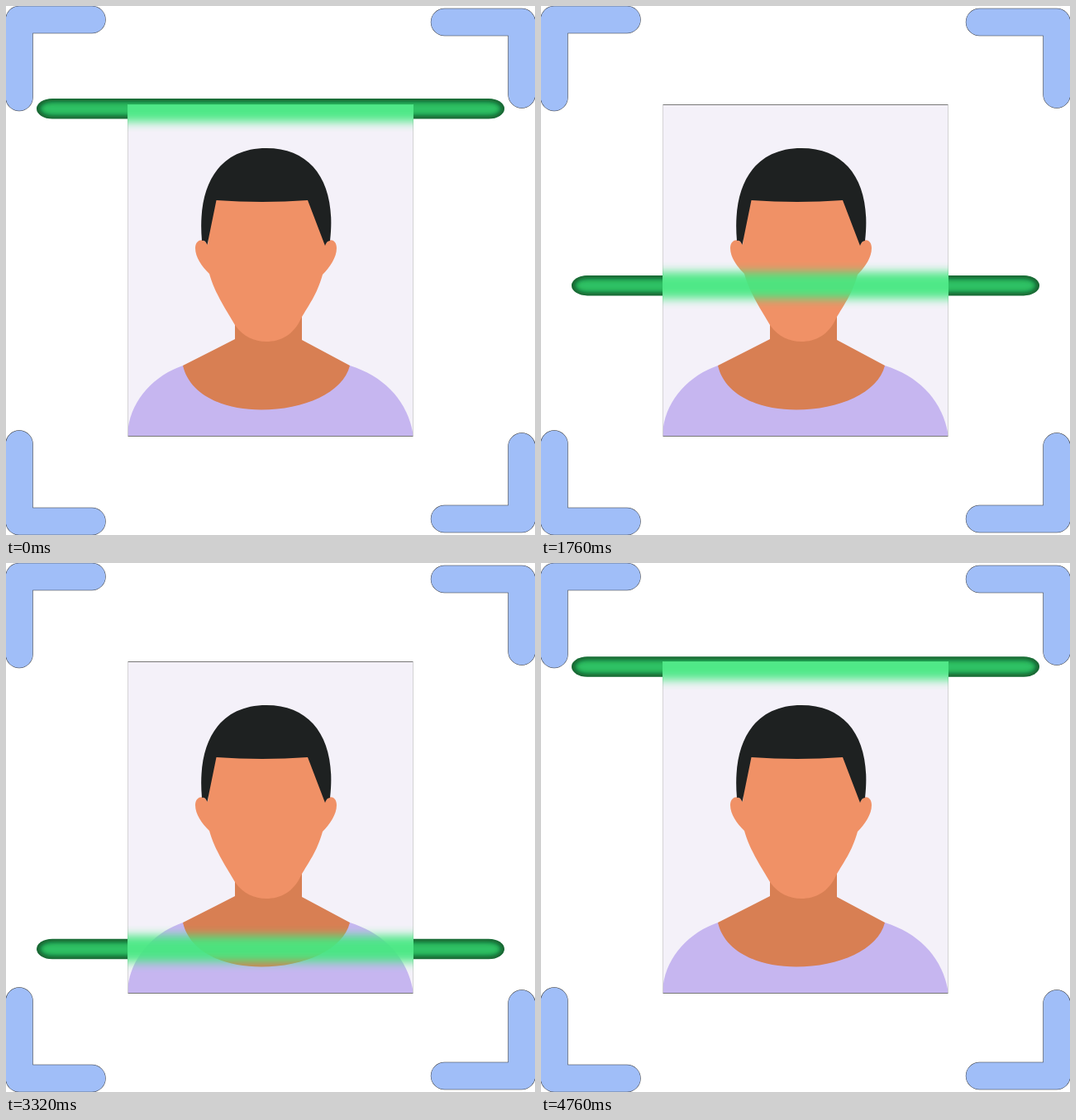
Animation, 640 px wide and 640 px high, one loop 4.8 s. Source, as an HTML page:

```html
<!DOCTYPE html>
<html lang="en">
<head>
<meta charset="utf-8">
<title>Face scan</title>
<style>
  html, body { margin: 0; width: 100%; height: 100%; overflow: hidden; background: #fff; }
  svg { display: block; width: 100vw; height: 100vh; }
  .corners { fill: none; stroke-linecap: round; stroke-linejoin: round; }
</style>
</head>
<body>
<svg viewBox="0 0 640 640">
  <defs>
    <path id="corners" d="M104 16.5H16V110.5M530.5 19.5H624V107M16 530V623.5H104M530.5 620.5H624V533"/>
    <rect id="capsule" x="37" y="-12" width="566" height="24.5" rx="19" ry="12.2"/>
    <clipPath id="capsuleClip"><use href="#capsule"/></clipPath>
    <clipPath id="photoClip"><rect x="147" y="119" width="346" height="402"/></clipPath>
    <filter id="edgeBlur" filterUnits="userSpaceOnUse" x="10" y="-40" width="620" height="80">
      <feGaussianBlur stdDeviation="3"/>
    </filter>
    <filter id="glowBlur" filterUnits="userSpaceOnUse" x="100" y="-60" width="440" height="120">
      <feGaussianBlur stdDeviation="0 6"/>
    </filter>
  </defs>

  <use href="#corners" class="corners" stroke="#333" stroke-width="33.4"/>
  <use href="#corners" class="corners" stroke="#a0bef8" stroke-width="32.5"/>

  <g class="scan" clip-path="url(#capsuleClip)">
    <use href="#capsule" fill="#2ec164"/>
    <use href="#capsule" fill="none" stroke="#0b4a22" stroke-width="7" filter="url(#edgeBlur)"/>
  </g>

  <g clip-path="url(#photoClip)">
    <rect x="147" y="119" width="346" height="402" fill="#f4f1f9"/>
    <path fill="#c6b6f0" d="M147 521C147 482 176 448 214 435H416C460 449 487 480 493 521Z"/>
    <path fill="#d87f53" d="M277 370V403L214 435C222 470 262 488.5 309 488.5C360 488.5 408 468 416 435L358 404V370Z"/>
    <path fill="#f09166" d="M250 230H370L386 289C390 280 400 282 400 293C400 304 392 316 383 325C376 350 366 362 357 378C348 398 332 406 315 406C300 406 287 400 277 386C264 364 252 346 246 324C237 315 229 304 229 293C229 282 240 280 244 289Z"/>
    <path fill="#1e2121" d="M237 284C231 216 258 172 315 172C372 172 400 216 392 284Q388 284 386 290L365 235Q310 239 254.500 235L243.500 289Q241 283 237 284Z"/>
    <path fill="none" stroke="#777" d="M147 119.500H493M147 520.500H493"/>
    <path fill="none" stroke="#ccc" d="M147.300 119V521M492.700 119V521"/>
    <g class="scan">
      <rect x="100" y="-16" width="440" height="32" fill="#45e880" opacity=".94" filter="url(#glowBlur)"/>
    </g>
  </g>
</svg>
<script>
const LOOP = 4800, LEG = 1200, STEP = 40, TOP = 124, TRAVEL = 389;
const scanParts = document.querySelectorAll('.scan');

// Cubic Bézier ease (handle, 0, 2/3, 1), solved by bisection
function ease(x, handle) {
  let lo = 0, hi = 1;
  for (let i = 0; i < 24; i++) {
    const s = (lo + hi) / 2, r = 1 - s;
    if (3 * r * r * s * handle + 2 * r * s * s + s ** 3 < x) lo = s; else hi = s;
  }
  return lo * lo * (3 - 2 * lo);
}

function scanY(time) {
  const leg = Math.floor(time / LEG);
  const progress = ease(time % LEG / LEG, leg === 2 ? 1 / 6 : 1 / 3);
  return TOP + TRAVEL * (leg % 2 ? 1 - progress : progress);
}

function draw() {
  const time = Math.floor(performance.now() % LOOP / STEP) * STEP;
  const move = `translate(0 ${scanY(time).toFixed(2)})`;
  scanParts.forEach(part => part.setAttribute('transform', move));
  requestAnimationFrame(draw);
}
draw();
</script>
</body>
</html>
```
